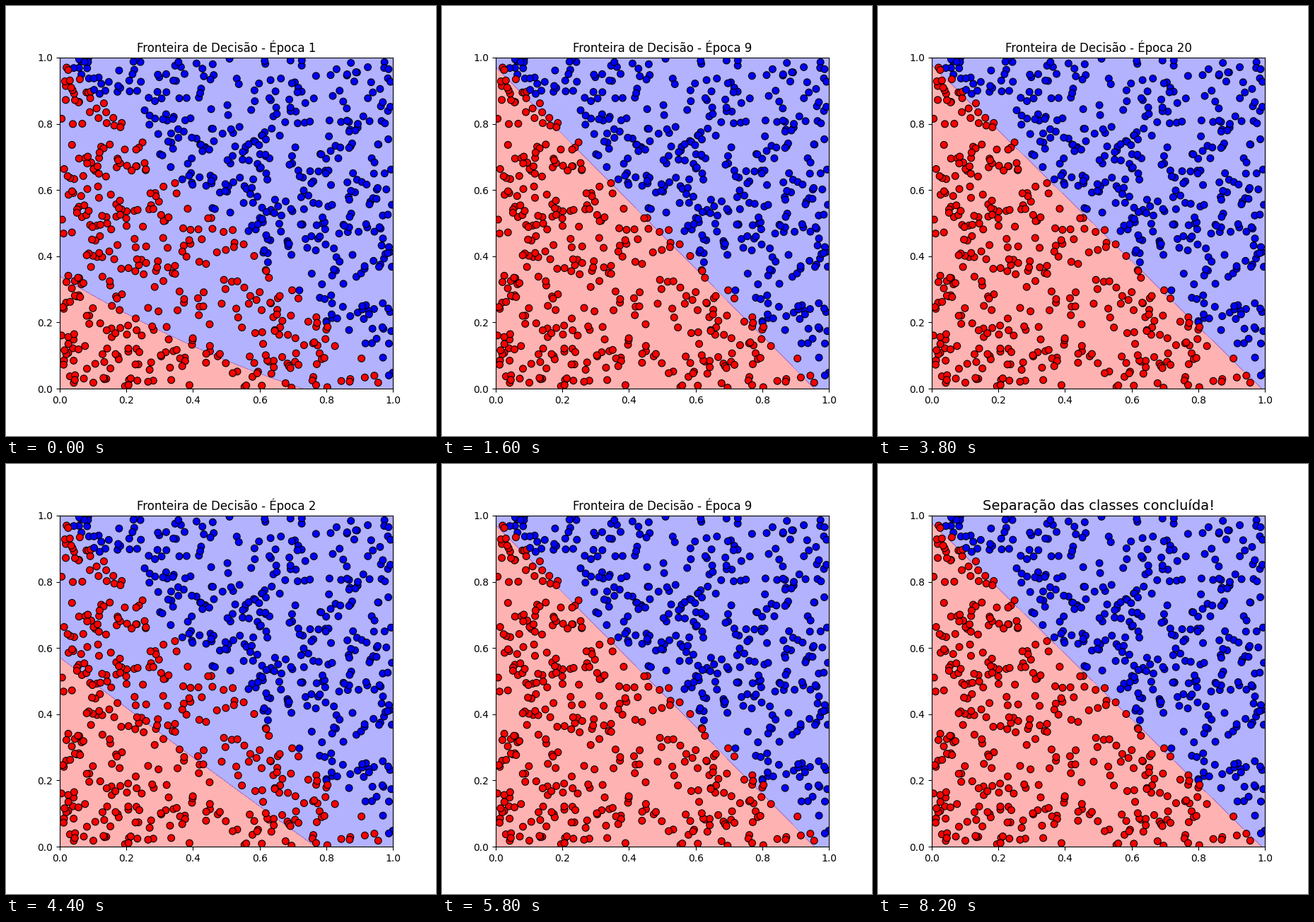
Write a matplotlib script that moves like this. It is 608x608 px and loops after 8.4 s.

```python
import numpy as np
import matplotlib.pyplot as plt
from matplotlib.animation import FuncAnimation

EPOCHS = 20
CYCLE = EPOCHS + 1
LOOPS = 2

# Training part (80 %) of 1000 uniform points, split by the line x + y = 1
points = np.random.RandomState(42).rand(1000, 2)
train = points[np.random.RandomState(42).permutation(1000)[200:]]
colors = np.where(train.sum(axis=1) > 1, "blue", "red")

axis = np.linspace(0, 1, 200)
xx, yy = np.meshgrid(axis, axis)

fig, ax = plt.subplots(figsize=(6.08, 6.08), dpi=100)
ax.set_xlim(0, 1)
ax.set_ylim(0, 1)
ax.scatter(train[:, 0], train[:, 1], c=colors, s=50, edgecolors="k",
           linewidths=0.8, zorder=2)
regions = []


def approach(limit, gap, rate, power, n):
    """Value that closes its gap to the limit as training goes on."""
    return limit - gap * np.exp(-rate * n ** power)


def score(epoch):
    """Signed height above the decision boundary on the grid."""
    n = epoch - 1
    drift = 0.01 * max(0, epoch - 16)  # the line slips back a little at the end
    y_cut = approach(1.02, 0.68, 0.417, 0.889, n) - drift
    x_cut = approach(1.04, 0.31, 0.131, 1.11, n) - drift
    bow = 0.1 * np.exp(-1.8 * n)
    u = xx / x_cut
    return yy - y_cut * (1 - u) + bow * u * (1 - u)


def update(frame):
    epoch = frame % CYCLE + 1
    while regions:
        regions.pop().remove()
    regions.append(ax.contourf(xx, yy, score(min(epoch, EPOCHS)),
                               levels=[-9, 0, 9], colors=["red", "blue"],
                               alpha=0.3, zorder=1))
    if epoch > EPOCHS:
        ax.set_title("Separação das classes concluída!", fontsize=14)
    else:
        ax.set_title(f"Fronteira de Decisão - Época {epoch}", fontsize=12)
    return []


anim = FuncAnimation(fig, update, frames=CYCLE * LOOPS, interval=200,
                     repeat=True, repeat_delay=0, blit=False)
plt.show()
```
